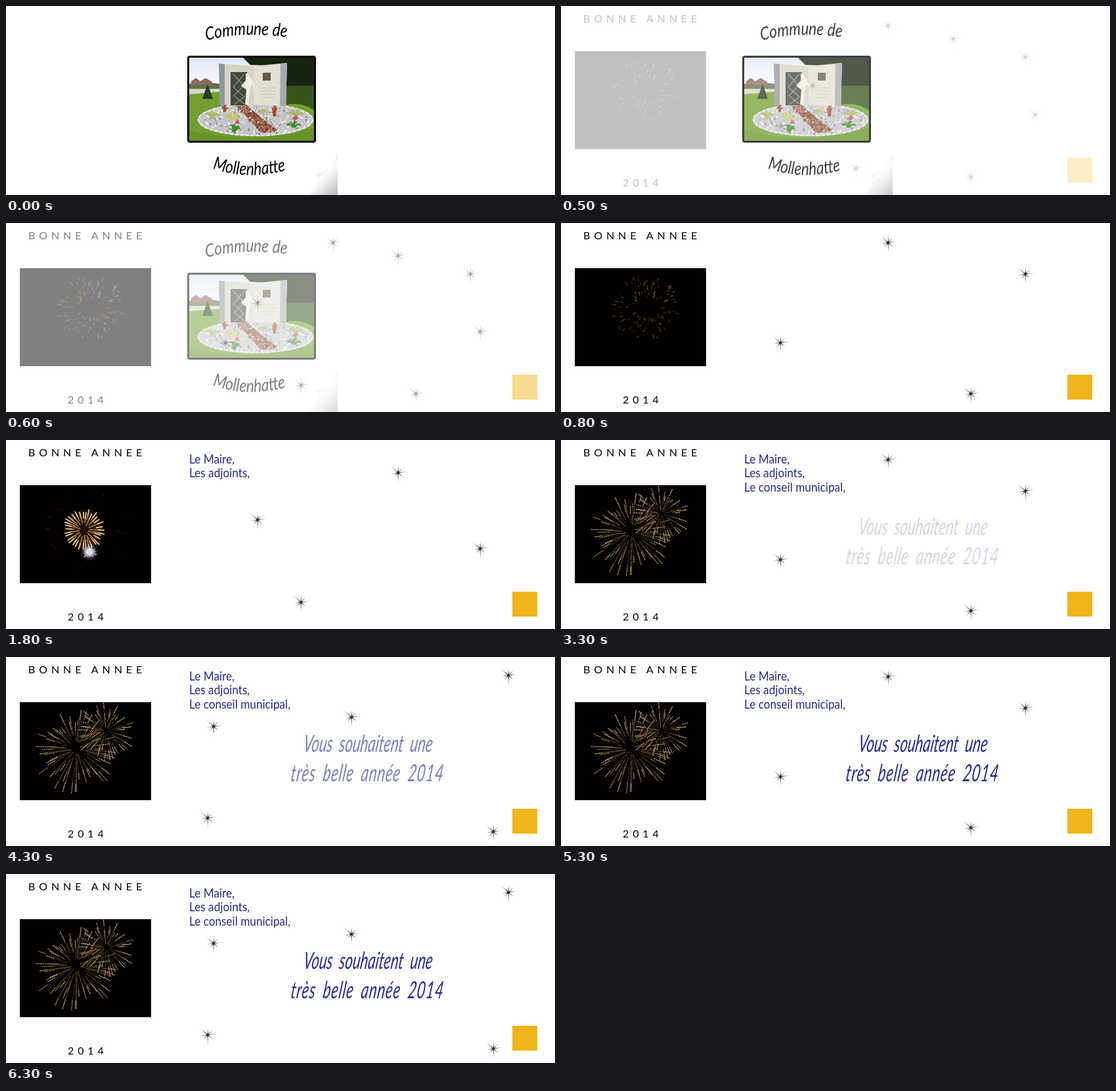
Animation of 836x289 px, one loop 8000 ms. Source, as an HTML page:

```html
<!DOCTYPE html>
<html lang="fr">
<head>
<meta charset="utf-8">
<title>Bonne année 2014</title>
<style>
html, body { margin: 0; width: 100%; height: 100%; overflow: hidden; background: #fff; }
svg { display: block; width: 836px; height: 289px; }
.caps { font: 400 16px Lato, sans-serif; letter-spacing: 5.9px; fill: #000; }
.lines { font: 400 20px Lato, sans-serif; fill: #262a8c; }
.hand { font: italic 400 27.5px Lato, sans-serif; fill: #000; }
.wish { font: italic 400 36px Lato, sans-serif; word-spacing: 8px; fill: #262a92; text-anchor: middle; }
</style>
</head>
<body>
<svg viewBox="0 0 836 289">
  <defs>
    <radialGradient id="ink" gradientUnits="userSpaceOnUse" cx="0" cy="0" r="17">
      <stop offset="0" stop-color="#1a1a1a"/>
      <stop offset=".25" stop-color="#333" stop-opacity=".75"/>
      <stop offset="1" stop-color="#666" stop-opacity=".15"/>
    </radialGradient>
    <radialGradient id="glow">
      <stop offset="0" stop-color="#fff"/>
      <stop offset=".4" stop-color="#d8d0e8" stop-opacity=".6"/>
      <stop offset="1" stop-color="#8878a0" stop-opacity="0"/>
    </radialGradient>
    <linearGradient id="curl" gradientUnits="userSpaceOnUse" x1="474" y1="252" x2="505" y2="284">
      <stop offset="0" stop-color="#ddd"/>
      <stop offset=".25" stop-color="#fdfdfd"/>
      <stop offset=".5" stop-color="#ececec"/>
      <stop offset="1" stop-color="#bdbdbd"/>
    </linearGradient>
    <linearGradient id="sky" x2="0" y2="1">
      <stop offset="0" stop-color="#dfe6f5"/>
      <stop offset=".35" stop-color="#fafbfc"/>
    </linearGradient>
    <path id="arch" d="M372 53 Q445 36 545 51"/>
    <path id="sag" d="M384 248 Q454 271 550 244"/>
    <path id="star" fill="url(#ink)"/>
    <clipPath id="frame"><rect x="278" y="78" width="192" height="129"/></clipPath>
    <clipPath id="night"><rect x="21" y="69" width="200" height="150"/></clipPath>
  </defs>

  <g id="cover">
    <g class="hand" transform="scale(.82 1)">
      <text><textPath href="#arch">Commune de</textPath></text>
      <text><textPath href="#sag">Mollenhatte</textPath></text>
    </g>
    <g clip-path="url(#frame)">
      <rect x="278" y="78" width="192" height="129" fill="url(#sky)"/>
      <path d="M278 119 L300 116 L326 119 V132 H278Z" fill="#62704e"/>
      <path d="M282 121 V115 L289 110 L296 115 L304 110 L314 116 V121Z" fill="#8d6a60"/>
      <path d="M360 78 H470 V140 H430 L420 92 L372 90Z" fill="#17240f"/>
      <rect x="278" y="126" width="192" height="81" fill="#739f30"/>
      <path d="M278 127 H326 V131 L278 135Z" fill="#d9d3d0"/>
      <path d="M427 122 H470 V160 Q450 146 427 151Z" fill="#36551d"/>
      <path d="M278 190 Q372 214 470 186 V207 H278Z" fill="#689329"/>
      <path d="M307 119 L315 142 H299Z" fill="#263a20"/>
      <ellipse cx="380" cy="174" rx="88" ry="25" fill="#c3c4c6"/>
      <ellipse cx="380" cy="174" rx="87" ry="24" fill="none" stroke="#e6e6e6" stroke-width="2.5" stroke-dasharray="6 2"/>
      <path d="M349 152 H367 Q388 171 414 190 L388 195 Q374 174 349 152Z" fill="#8e5641"/>
      <g id="gravel"></g>
      <path d="M324 88 L377 92 V152 L326 154Z" fill="#d7d2c4"/>
      <path d="M377 92 L428 87 L426 154 L377 151Z" fill="#e2dfd2"/>
      <path d="M324 88 L333 89 V153 L326 154Z" fill="#8c969d"/>
      <path d="M418 88 L428 87 L426 154 L417 153Z" fill="#a6aaac"/>
      <path d="M342 101 H367 V152 H342Z" fill="#414840"/>
      <path d="M346 104 L362 122 L347 137 L363 150 M363 104 L346 124 L363 139 L347 151" stroke="#8f9284" stroke-width="1.2" fill="none"/>
      <path d="M365 104 Q369 101 370 107 L377 116 L380 130 L374 119 L371 130 L369 151 H364 L366 128 L358 122 L365 114Z" fill="#eeede6"/>
      <rect x="391" y="102" width="12" height="12" fill="#625b48"/>
      <path d="M389 125 H411 M386 130 H412 M387 135 H410 M390 140 H408" stroke="#c6c2b5"/>
      <g id="plants" fill="none"></g>
    </g>
    <rect x="277.5" y="77.5" width="193" height="130" rx="2.5" fill="none" stroke="#000" stroke-width="3"/>
    <path d="M505 224 C500 244 487 254 473 257 C477 270 469 283 458 289 H505Z" fill="url(#curl)"/>
  </g>

  <g id="card">
    <text class="caps" x="34" y="25">BONNE ANNEE</text>
    <text class="caps" x="94" y="276">2014</text>
    <rect x="21.5" y="69.5" width="199" height="149" fill="#020100" stroke="#1a1a1a"/>
    <g id="shows" clip-path="url(#night)" fill="none" stroke-linecap="round"></g>
    <g class="lines" id="lines">
      <text transform="translate(279 36) scale(.86 1)">Le Maire,</text>
      <text transform="translate(279 57) scale(.86 1)">Les adjoints,</text>
      <text transform="translate(279 79) scale(.86 1)">Le conseil municipal,</text>
    </g>
    <g class="wish" id="wish">
      <text transform="translate(550 145) skewX(-8) scale(.615 1)">Vous souhaitent une</text>
      <text transform="translate(549 190) skewX(-8) scale(.615 1)" letter-spacing="1.4">très belle année 2014</text>
    </g>
    <rect x="771" y="232" width="38" height="38" fill="#efb51a"/>
    <g id="stars"></g>
  </g>
</svg>
<script>
const $ = id => document.getElementById(id);
const LOOP = 8000, TAU = Math.PI * 2;

let seed = 7;
const rnd = (a = 0, b = 1) => {
  seed = (seed * 16807) % 2147483647;
  return a + (b - a) * seed / 2147483647;
};

function add(parent, tag, attrs = {}) {
  const el = document.createElementNS("http://www.w3.org/2000/svg", tag);
  for (const k in attrs) el.setAttribute(k, attrs[k]);
  return parent.appendChild(el);
}

// Photo details
function stones(n, colors, place) {
  for (let i = 0; i < n; i++) {
    const [cx, cy] = place();
    add($("gravel"), "circle", { cx, cy, r: rnd(.6, 1.6), fill: colors[i % colors.length] });
  }
}
stones(320, ["#f2f2f2", "#85878a", "#dadadc"], () => {
  const a = rnd(0, TAU), r = Math.sqrt(rnd());
  return [380 + 84 * r * Math.cos(a), 174 + 22 * r * Math.sin(a)];
});
stones(170, ["#9a5a42", "#6d3d2e", "#c08a72"], () => {
  const u = rnd();
  return [358 + 43 * u + rnd(-1, 1) * (9 + 5 * u), 153 + 40 * u];
});

function plant(x, y, w, h, color) {
  let d = "";
  for (let i = 0; i < 15; i++) {
    const u = rnd(-1, 1), top = y - h * rnd(.6, 1) * (1 - u * u * .5);
    d += `M${x + u * 2} ${y}Q${x + u * w * .4} ${top} ${x + u * w} ${top + 3}`;
  }
  add($("plants"), "path", { d, stroke: color, "stroke-width": 1.3 });
}
plant(313, 172, 14, 15, "#a9ba58");
plant(345, 175, 14, 17, "#c6c765");
plant(441, 168, 12, 13, "#aab75a");
plant(391, 165, 10, 10, "#b5b763");
plant(333, 162, 6, 14, "#9a4b35");
plant(409, 169, 6, 21, "#a4452d");
plant(347, 193, 11, 16, "#3f8a25");
plant(438, 186, 12, 15, "#3f8a25");
plant(441, 174, 4, 10, "#d34b66");
plant(352, 180, 4, 8, "#d0526b");

// Fireworks
function streak(g, cx, cy, a, r0, r1, color, width, drop = 0, dash = "") {
  const at = r => [cx + r * Math.cos(a), cy + r * Math.sin(a) + drop * r * r / 900];
  add(g, "path", {
    d: `M${at(r0)}Q${at((r0 + r1) / 2)} ${at(r1)}`,
    stroke: color, "stroke-width": width, "stroke-dasharray": dash
  });
}

function embers(g, cx, cy, n, r0, r1, colors) {
  for (let i = 0; i < n; i++) {
    const r = rnd(r0, r1);
    streak(g, cx, cy, rnd(0, TAU), r, r + rnd(1, 6), colors[i % colors.length], rnd(.6, 1.3));
  }
}

function rays(g, cx, cy, n, r) {
  for (let i = 0; i < n; i++) {
    const a = (i + rnd(-.8, .8)) / n * TAU, end = r * rnd(.62, 1.03);
    streak(g, cx, cy, a, r * rnd(.08, .45), end, i % 3 ? "#5a4522" : "#8b6f3d", .9, .8, "4 1.2 2 1.6");
    streak(g, cx, cy, a, end * rnd(.65, .85), end, i % 2 ? "#a58a58" : "#d0b787", 1.1, .8, "1.5 1.8");
  }
}

const shows = [0, 1, 2, 3].map(() => add($("shows"), "g"));

embers(shows[0], 127, 129, 125, 15, 49, ["#6b4716", "#8f642a", "#4d300d"]);
embers(shows[1], 123, 127, 90, 20, 55, ["#4d330f", "#6a4618", "#372209"]);

embers(shows[2], 125, 134, 22, 42, 62, ["#2b1208", "#351d0b"]);
add(shows[2], "circle", { cx: 119, cy: 137, r: 30, fill: "#6b3d0c", opacity: .25 });
for (let i = 0; i < 34; i++) {
  const a = (i + rnd(-.3, .3)) / 34 * TAU, end = rnd(26, 33), start = i % 2 ? rnd(14, 20) : rnd(6, 11);
  streak(shows[2], 119, 137, a, start, end, "#a87830", 1.8);
  streak(shows[2], 119, 137, a, end - 9, end, "#efd89a", 1.4);
}
add(shows[2], "circle", { cx: 127, cy: 171, r: 14, fill: "url(#glow)" });
for (let i = 0; i < 16; i++) streak(shows[2], 127, 171, i / 16 * TAU, 3, rnd(6, 12), "#f4efff", 1.3, 0, "2 1.5");

rays(shows[3], 107, 141, 62, 64);
rays(shows[3], 152, 113, 44, 45);

// Sparkles
const tips = [[-13, -12], [1, -11], [8, -8], [15, -2], [8, 7], [1, 18], [-7, 8], [-11, 2]];
$("star").setAttribute("d", tips.map(([x, y]) => {
  const k = .85 / Math.hypot(x, y);
  return `M${-y * k} ${x * k}L${x} ${y}L${y * k} ${-x * k}Z`;
}).join("") + "M-1.5 0a1.5 1.5 0 1 0 3 0a1.5 1.5 0 1 0-3 0Z");

const sets = [
  [[498, 30], [707, 78], [334, 183], [624, 261]],
  [[597, 50], [383, 122], [722, 166], [449, 248]],
  [[765, 28], [526, 92], [316, 106], [307, 246], [742, 267]],
  [[784, 15]]
].map(points => {
  const g = add($("stars"), "g");
  for (const [x, y] of points) add(g, "use", { href: "#star", transform: `translate(${x} ${y})` });
  return g;
});

const show = (el, on) => el.setAttribute("display", on ? "inline" : "none");

function render(t) {
  const fade = t < 500 ? 0 : Math.min(1, (Math.floor((t - 500) / 100) + 1) / 4);
  const beat = t < 800 ? 0 : Math.floor((t - 800) / 500);
  // The last change falls at 6300 ms
  const step = Math.min(beat, 11);
  const active = step ? (step - 1) % 4 : 0;

  $("cover").setAttribute("opacity", 1 - fade);
  $("card").setAttribute("opacity", fade);
  $("stars").setAttribute("opacity", fade < 1 ? .85 : 1);
  sets.forEach((g, i) => show(g, i === active || (fade < 1 && i === 1)));
  shows.forEach((g, i) => show(g, i === Math.min(step, 3)));
  [...$("lines").children].forEach((el, i) => show(el, step > i));
  $("wish").setAttribute("opacity", Math.max(0, Math.min(1, (step - 4) * .2)));
}

const start = performance.now();
function tick() {
  render((performance.now() - start) % LOOP);
  requestAnimationFrame(tick);
}
tick();
</script>
</body>
</html>
```
